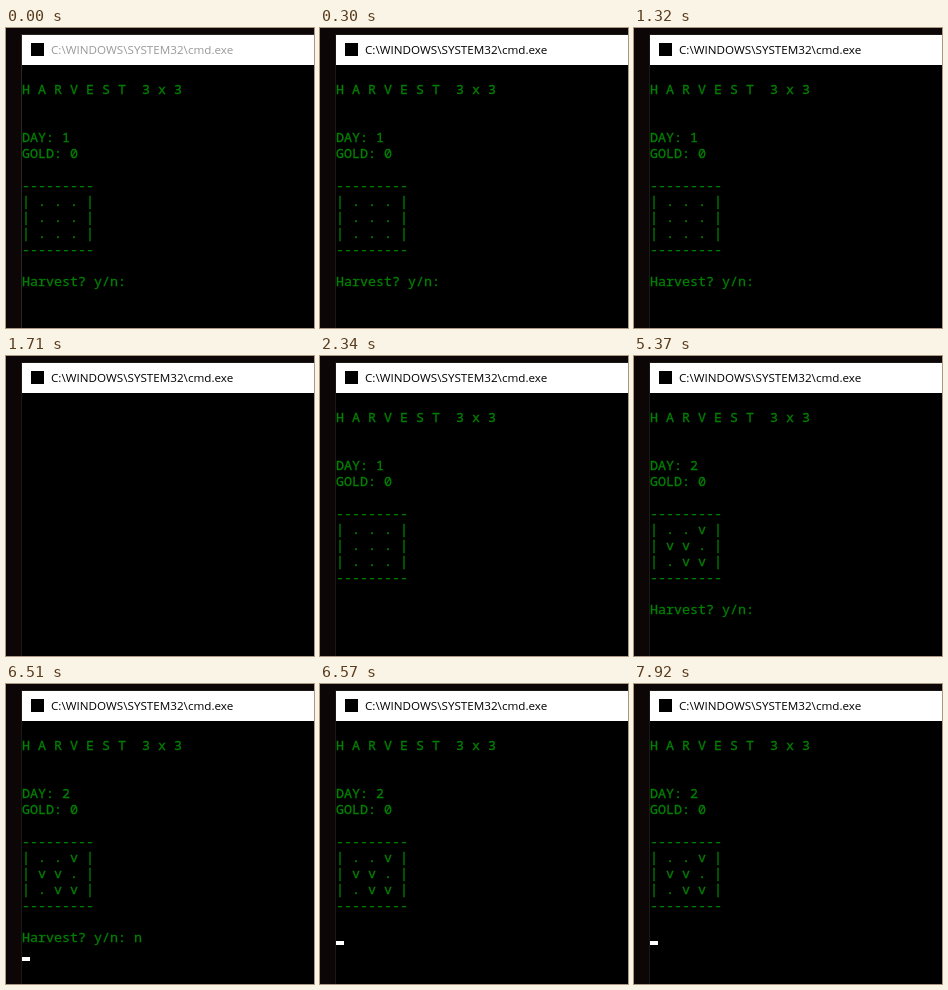
Write an HTML page that moves like this. It is 308 by 300 pixels and loops after 8000 ms.

```html
<!DOCTYPE html>
<html lang="en">
<head>
<meta charset="utf-8">
<title>Harvest</title>
<style>
  html, body { margin: 0; width: 100%; height: 100%; overflow: hidden; background: #0c0606; }
  svg { display: block; width: 308px; height: 300px; }
  #caption { font: 11.66px "Open Sans", "Noto Sans", sans-serif; }
  #screen text {
    font: 13.333px "Noto Sans Mono", "DejaVu Sans Mono", monospace;
    font-variant-ligatures: none;
    font-variant-numeric: slashed-zero;
    white-space: pre;
    fill: #008000;
    stroke: #008000;
    stroke-width: 0.3px;
  }
</style>
</head>
<body>
<svg viewBox="0 0 308 300" xmlns="http://www.w3.org/2000/svg">
  <rect width="308" height="300" fill="#0c0606"/>
  <rect id="border" x="15" y="6" width="293" height="294"/>
  <rect x="16" y="7" width="292" height="30" fill="#fff"/>
  <rect x="25" y="15" width="13" height="13" fill="#000"/>
  <text id="caption" x="45" y="26">C:\WINDOWS\SYSTEM32\cmd.exe</text>
  <rect x="16" y="37" width="292" height="263" fill="#000"/>
  <g id="screen"></g>
  <rect id="cursor" width="8" height="4" fill="#fff"/>
</svg>
<script>
const LOOP = 8000, FOCUS_AT = 300;
const LEFT = 16, TOP = 37, CELL_W = 8, CELL_H = 16;
const PROMPT_ROW = 13;
const PROMPT = "Harvest? y/n: ";
const FIELDS = { 1: ["...", "...", "..."], 2: ["..v", "vv.", ".vv"] };

const $ = id => document.getElementById(id);
const border = $("border"), caption = $("caption"), cursor = $("cursor");

const rows = Array.from({ length: PROMPT_ROW + 1 }, (_, row) => {
  const line = document.createElementNS("http://www.w3.org/2000/svg", "text");
  line.setAttribute("x", LEFT);
  line.setAttribute("y", TOP + row * CELL_H + 13);
  return $("screen").appendChild(line);
});

// Cursor positions, as [column, row]
const ASK = [PROMPT.length, PROMPT_ROW];
const TYPED = [PROMPT.length + 1, PROMPT_ROW];
const ENTERED = [0, PROMPT_ROW + 1];
const IDLE = [0, PROMPT_ROW];

// [start time, day (0 = cleared screen), last line, cursor or null]
const steps = [
  [0, 1, PROMPT, null],
  [810, 1, PROMPT, ASK],
  [1320, 1, PROMPT, null],
  [1650, 1, PROMPT + "n", TYPED],
  [1680, 1, PROMPT + "n", ENTERED],
  [1710, 0, "", null],
  [1740, 1, "", IDLE],
  [2340, 1, "", null],
  [2850, 1, "", IDLE],
  [3360, 1, "", null],
  [3870, 1, "", IDLE],
  [4350, 1, "", null],
  [4620, 2, PROMPT, ASK],
  [5370, 2, PROMPT, null],
  [5790, 2, PROMPT + "n", null],
  [5880, 2, PROMPT + "n", TYPED],
  [6390, 2, PROMPT + "n", null],
  [6510, 2, PROMPT + "n", ENTERED],
  [6540, 0, "", null],
  [6570, 2, "", IDLE],
  [7380, 2, "", null],
  [7920, 2, "", IDLE]
];

function screenLines(day, lastLine) {
  if (!day) return [];
  const fence = "-".repeat(9);
  const field = FIELDS[day].map(plants => `| ${[...plants].join(" ")} |`);
  return ["", "H A R V E S T  3 x 3", "", "", `DAY: ${day}`, "GOLD: 0", "",
          fence, ...field, fence, "", lastLine];
}

function render(time) {
  const focused = time >= FOCUS_AT;
  border.setAttribute("fill", focused ? "#1b1818" : "#2a2727");
  caption.setAttribute("fill", focused ? "#000" : "#999");

  const [, day, lastLine, position] = steps.findLast(step => step[0] <= time);
  const lines = screenLines(day, lastLine);
  rows.forEach((row, i) => {
    const text = lines[i] || "";
    if (row.textContent !== text) row.textContent = text;
  });

  cursor.setAttribute("visibility", position ? "visible" : "hidden");
  if (position) {
    cursor.setAttribute("x", LEFT + position[0] * CELL_W);
    cursor.setAttribute("y", TOP + (position[1] + 1) * CELL_H - 4);
  }
}

const start = performance.now();
function tick() {
  render((performance.now() - start) % LOOP);
  requestAnimationFrame(tick);
}
tick();
</script>
</body>
</html>
```
